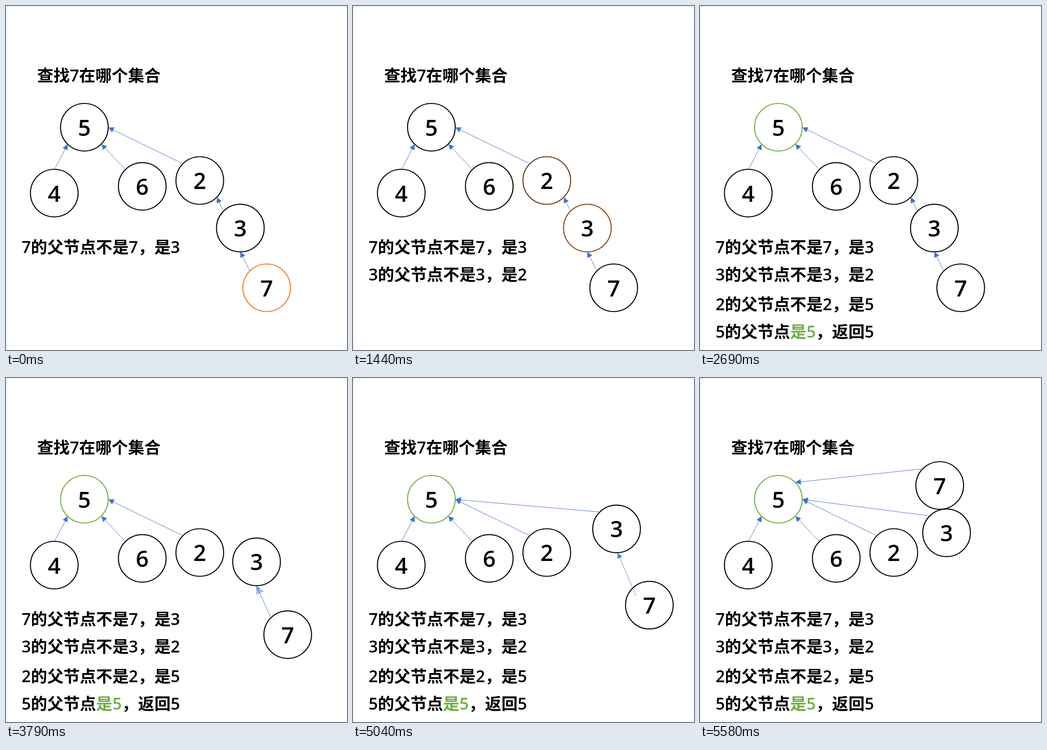
An HTML page with a canvas for the animation above (6.53 s loop, 744 px wide and 752 px high).

```html
<!DOCTYPE html>
<html lang="zh-CN">
<head>
<meta charset="utf-8">
<title>并查集查找</title>
<style>
  html, body { margin: 0; width: 100%; height: 100%; overflow: hidden; background: #fff; }
  canvas { display: block; }
</style>
</head>
<body>
<canvas id="stage" width="744" height="752"></canvas>
<script>
const ctx = document.getElementById('stage').getContext('2d');
const LOOP = 6530, R = 52, DIAG = 37;
const BLACK = [0, 0, 0], ORANGE = [237, 125, 49], GREEN = [112, 173, 71];
const BLUE = '#4472c4';
const FAMILY = '"Open Sans", "Noto Sans CJK SC", "Noto Sans CJK", sans-serif';

// [time, progress]: the whole part is the slide, the fraction its morph to the next
const STEPS = [
  [0, 0], [540, 0.6], [720, 0.94], [900, 1],
  [1440, 1.42], [1620, 1.85], [1790, 2],
  [2330, 2.42], [2510, 2.85], [2690, 3],
  [3790, 3.535], [3970, 3.87], [4150, 4],
  [5040, 4.06], [5220, 4.85], [5400, 4.985], [5580, 5]
];

const clamp = v => Math.max(0, Math.min(1, v));
const mix = (a, b, p) => a.map((v, i) => v + (b[i] - v) * p);
const rgb = c => `rgb(${c.map(Math.round).join(',')})`;
const fadeIn = p => clamp(2 * p - 1);
const fadeOut = p => clamp(1 - 2 * p);
const peak = v => clamp(1 - Math.abs(v));

function progressAt(t) {
  let s = 0;
  for (const [start, value] of STEPS) if (t >= start) s = value;
  return s;
}

// Position along slides 3, 4 and 5
function travel(s, a, b, c) {
  return s < 4 ? mix(a, b, clamp(s - 3)) : mix(b, c, clamp(s - 4));
}

function node(label, [x, y], accent = BLACK, amount = 0) {
  ctx.beginPath();
  ctx.arc(x, y, R, 0, Math.PI * 2);
  ctx.fillStyle = '#fff';
  ctx.fill();
  ctx.lineWidth = 2.2;
  ctx.strokeStyle = rgb(mix(BLACK, accent, amount));
  ctx.stroke();
  ctx.fillStyle = '#000';
  ctx.font = `600 49px ${FAMILY}`;
  ctx.textAlign = 'center';
  ctx.fillText(label, x, y + 18.5);
}

function head([x, y], angle, size) {
  ctx.save();
  ctx.translate(x, y);
  ctx.rotate(angle);
  ctx.beginPath();
  ctx.moveTo(0, 0);
  ctx.lineTo(-size, -size / 2);
  ctx.lineTo(-size, size / 2);
  ctx.fill();
  ctx.restore();
}

function arrow(from, to, alpha = 1, blend = 0) {
  if (alpha <= 0) return;
  const angle = Math.atan2(to[1] - from[1], to[0] - from[0]);
  ctx.globalAlpha = alpha;
  ctx.strokeStyle = ctx.fillStyle = BLUE;
  ctx.lineWidth = 1;
  ctx.beginPath();
  ctx.moveTo(...from);
  ctx.lineTo(to[0] - 6 * Math.cos(angle), to[1] - 6 * Math.sin(angle));
  ctx.stroke();
  if (blend > 0 && blend < 1) {
    // stretched and shrunken heads cross-fade during the morph
    ctx.globalAlpha = 1 - blend;
    head(to, angle, 12 + 11 * blend);
    ctx.globalAlpha = blend;
    head(to, angle, 5 + 7 * blend);
  } else {
    head(to, angle, 12);
  }
  ctx.globalAlpha = 1;
}

// Runs alternate between black and green
function text(x, y, runs, alpha = 1) {
  if (alpha <= 0) return;
  ctx.globalAlpha = alpha;
  ctx.font = `600 35.6px ${FAMILY}`;
  ctx.textAlign = 'left';
  runs.forEach((run, i) => {
    ctx.fillStyle = i % 2 ? rgb(GREEN) : '#000';
    ctx.fillText(run, x, y);
    x += ctx.measureText(run).width;
  });
  ctx.globalAlpha = 1;
}

function draw(s) {
  ctx.fillStyle = '#fff';
  ctx.fillRect(0, 0, 744, 752);
  ctx.fillStyle = '#e0e0e0';
  ctx.fillRect(0, 0, 744, 1);
  ctx.fillRect(0, 0, 1, 752);

  const three = travel(s, [511.3, 485.4], [577.4, 329.4], [538, 338.4]);
  const seven = travel(s, [568.8, 616], [654.5, 513.3], [523, 235]);
  const corner = ([x, y]) => [x - DIAG, y - DIAG];
  const bottom = ([x, y]) => [x, y + R];

  node('5', [171, 265], GREEN, clamp(s - 2));
  node('4', [105.3, 409]);
  node('6', [297.3, 394.3]);
  node('2', [422.8, 381.5], ORANGE, peak(s - 2));
  node('3', three, ORANGE, peak(s - 1));
  node('7', seven, ORANGE, peak(s));

  const root = [223.3, 265.5];
  arrow([106, 357], [134.5, 302]);
  arrow([260.5, 357.5], [208, 302]);
  arrow([385.5, 344.7], root);
  arrow([474.5, 448.5], [460, 418.3], fadeOut(s - 3));
  arrow(s < 4 ? [540.4, 292.4] : corner(three), root, fadeIn(s - 3));
  arrow([486, 198.5], [208, 228.3], fadeIn(s - 4));
  if (s <= 4) arrow(corner(seven), bottom(three), 1, clamp(s - 3));
  else arrow([617.5, 476.3], [577.4, 381.9], fadeOut(s - 4));

  text(68, 165, ['查找7在哪个集合']);
  text(34, 540, ['7的父节点不是7，是3']);
  text(34, 600, ['3的父节点不是3，是2'], fadeIn(s));
  text(34, 665, ['2的父节点不是2，是5'], fadeIn(s - 1));
  text(34, 725, ['5的父节点', '是5', '，返回5'], fadeIn(s - 2));
}

const begin = performance.now();
function tick() {
  draw(progressAt((performance.now() - begin) % LOOP));
  requestAnimationFrame(tick);
}
tick();
</script>
</body>
</html>
```
